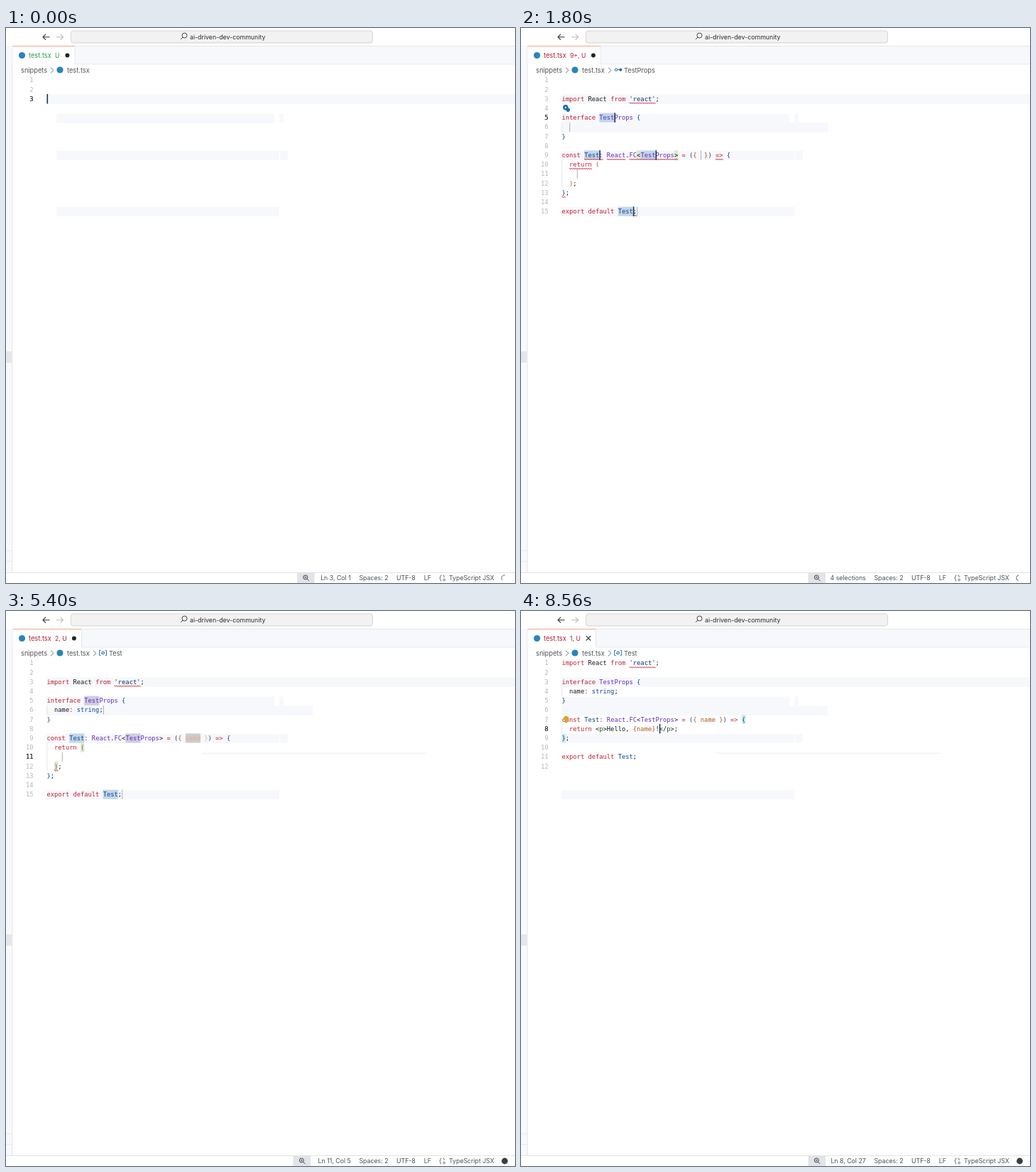
An HTML page that plays this animation: 717x781 px, repeating every 8910 ms.

```html
<!DOCTYPE html>
<html lang="en">
<head>
<meta charset="utf-8">
<title>Editor snippet</title>
<style>
html, body { margin: 0; width: 100%; height: 100%; overflow: hidden; background: #fff; }
svg { display: block; width: 100%; height: 100%; }
text { white-space: pre; }
.mono { font-family: "DejaVu Sans Mono", monospace; font-size: 8.77px; }
.ui { font-family: Inter, "Open Sans", sans-serif; font-size: 9.25px; }
.status { font-size: 8.75px; }
</style>
</head>
<body>
<svg id="stage" viewBox="0 0 717 781" xmlns="http://www.w3.org/2000/svg"></svg>
<script>
const LOOP = 8910, STEP = 200, LAST_STEP = 42, LAST_TIME = 8560;
const CHAR = 5.28, LEFT = 57.5, ROW = 13.2;
const COLORS = {
  r: '#bd1f30', d: '#16191f', s: '#06306b', p: '#622cbc', b: '#0b4597',
  o: '#b8501c', f: '#e3b08f', g: '#116329', y: '#979ba1', k: '#b0a0d0'
};
const stage = document.getElementById('stage');

const colX = col => LEFT + col * CHAR;
const rowY = row => 73.3 + (row - 1) * ROW;
const esc = s => s.replace(/&/g, '&amp;').replace(/</g, '&lt;');
const rect = (x, y, w, h, fill, more = '') =>
  `<rect x="${x}" y="${y}" width="${w}" height="${h}" fill="${fill}" ${more}/>`;
const path = (d, color, width = 1) =>
  `<path d="${d}" fill="none" stroke="${color}" stroke-width="${width}"/>`;
const dot = (x, y, r, fill) => `<circle cx="${x}" cy="${y}" r="${r}" fill="${fill}"/>`;
const text = (x, y, s, fill, cls = 'ui', more = '') =>
  `<text x="${x}" y="${y}" fill="${fill}" class="${cls}" ${more}>${esc(s)}</text>`;
const END = 'text-anchor="end"';

// "~x" inside a code line switches to colour x
function code(row, line) {
  const spans = line.split('~').slice(1).map(part =>
    `<tspan fill="${COLORS[part[0]]}"${part[0] === 'y' ? ' font-style="italic"' : ''}>${esc(part.slice(1))}</tspan>`);
  return `<text class="mono" x="${LEFT}" y="${rowY(row) + 3.1}">${spans.join('')}</text>`;
}
const mark = (row, col, len, fill) =>
  rect(colX(col), rowY(row) - 6.5, len * CHAR, 13, fill);
const caret = (row, col) => rect(colX(col), rowY(row) - 6.8, 1.6, 13.6, '#12355f');
const stop = (row, col) => rect(colX(col) + .2, rowY(row) - 6.5, .9, 13, '#a9a5ad');
const guide = (row, col = 0, rows = 1) =>
  rect(colX(col), rowY(row) - 6.5, .7, ROW * rows, '#dcdde0');

function squiggle(row, col, len) {
  const x = colX(col), y = rowY(row) + 6;
  let d = `M${x} ${y}`;
  for (let i = 0; i < len * 2; i++) d += `q${CHAR / 8} -1.8 ${CHAR / 4} 0t${CHAR / 4} 0`;
  return path(d, '#cf3040', .9);
}
function bulb(row) {
  const y = rowY(row);
  return dot(63.6, y - 1.2, 3.6, '#d9a522') + rect(61.9, y + 1.5, 3.4, 3.4, '#d9a522', 'rx=".8"');
}
function wrench(x, y, color) {
  return path(`M${x - 4} ${y + 4}l4.4 -4.4a2.8 2.8 0 0 1 3.6 -3.6l-1.8 1.8 1.4 1.4 1.8 -1.8a2.8 2.8 0 0 1 -3.6 3.6l-4.4 4.4z`, color, .9);
}
const lens = (x, y, r, dx) =>
  `<circle cx="${x}" cy="${y}" r="${r}" fill="none" stroke="#444"/>` +
  path(`M${x + dx * r * .7} ${y + r * .7}l${dx * 3} 3`, '#444');
const chevron = x => path(`M${x - 2} 55.7l4 3.8 -4 3.8`, '#666', .9);

function snapshot(k) {
  const name = k < 6 ? '' : 'Test'.slice(0, Math.min(4, k - 5));
  const formatted = k >= 39;
  const prop = k < 12 ? '~d  '
    : k < 13 ? '~d  n'
    : k < 14 ? '~d  na'
    : k < 15 ? '~d  name'
    : k < 16 ? '~d  name~r: ~ystring;'
    : '~d  name~r: ~bstring~d;';
  const arg = k < 20 ? '' : 'name'.slice(0, k - 19);
  const faded = k >= 25 && k < 36;
  const hello = 'Hello, {name}!'.slice(0, Math.max(0, Math.min(14, Math.round((k - 32) * 2.4))));
  const greeting = hello.replace(/\{\w*\}?/, '~o$&~d');
  const imports = "~rimport ~dReact ~rfrom ~s'react'~d;";
  const face = `~rinterface ~p${name}${k === 6 ? '~k' : ''}Props ~b{`;
  const head = `~rconst ~b${name}~r: ~pReact~d.~pFC~d<~p${name}Props~d> ~r= ~b(~o{ ${faded ? '~f' : ''}${arg} ${faded ? '~f' : ''}}~b) ~r=> ~b{`;
  const foot = `~rexport default ~b${name}~d;`;
  let lines, cur;

  if (k < 4) {
    const typed = 'rfc'.slice(0, k);
    lines = ['', '', '~d' + typed];
    cur = [3, k];
  } else if (formatted) {
    lines = [imports, '', face, prop, '~b}', '', head,
      '~r  return ~d<~gp~d>Hello, ~o{name}~d!</~gp~d>;', '~b}~d;', '', foot, ''];
    cur = [8, 26];
  } else {
    const body = k < 28 ? [''] : k < 29 ? ['~d    <'] : k < 30 ? ['~d    <~gp']
      : k < 31 ? ['~d    <~gp~d></~gp~d>']
      : ['~d    <~gp~d>', '~d      ' + greeting, '~d    </~gp~d>'];
    lines = ['', '', imports, '', face, prop, '~b}', '', head, '~r  return ~o(',
      ...body, '~o  )~d;', '~b}~d;', '', foot];
    if (k < 11) cur = [5, 10 + name.length];
    else if (k < 19) cur = [6, [2, 3, 4, 6, 8][k - 11] || 15];
    else if (k < 25) cur = [9, 37 + arg.length];
    else if (k < 31) cur = [11, [4, 5, 6, 7][Math.max(0, k - 27)]];
    else cur = [12, 6 + hello.length];
  }
  return { name, arg, lines, cur, formatted };
}

function marks(k, s) {
  const n = s.name.length, blue = '#c3d6e8', violet = '#d0cbe1', teal = '#c9ece8', green = '#d5ead2';
  let out = '';
  if (k >= 6 && k < 31) {
    const inner = k < 11 ? blue : violet;
    out += mark(5, 10, n, inner) + mark(9, 6, n, blue) + mark(9, 17 + n, n, inner) + mark(15, 15, n, blue);
  }
  if (k >= 4 && k < 11) out += mark(9, 16 + n + 1 - 1, 1, green) + mark(9, 17 + 2 * n + 5, 1, green);
  if (k >= 11 && k < 16) out += mark(5, 20, 1, teal) + mark(7, 0, 1, teal);
  if (k >= 12 && k < 16) out += mark(6, 2, s.cur[1] - 2, '#ced2d8');
  if (k >= 19 && k < 25)
    out += mark(9, 36, 1, '#eadfce') + mark(9, 38 + s.arg.length, 1, '#eadfce') + mark(9, 37, s.arg.length, '#dccfc8');
  if (k >= 25 && k < 31) out += mark(9, 37, 4, '#cfcbca');
  if (k >= 25 && !s.formatted) out += mark(10, 9, 1, green) + mark(k < 31 ? 12 : 14, 2, 1, green);
  if (s.formatted) out += mark(7, 48, 1, teal) + mark(9, 0, 1, teal);
  return out;
}

function bands(k) {
  const c = '#f7f8fc', early = k < 4;
  let out = rect(57, 93, 660, 14, '#f6f8fc');
  const left = early ? 71 : 57;
  for (const [y, w] of [[120.5, 391], [173, 397], [252, 385]]) out += rect(left, y, w - left, 13, c);
  out += rect(378, 120.5, 7, 13, '#fff') + rect(385, 173, 1, 13, '#fff');
  if (k > 6) out += rect(57, 133.5, 375, 13.5, c);
  if (k >= 25) out += rect(275, 199.5, 316, 1.2, '#eeeff2');
  return out;
}

function overlays(k, s) {
  const n = s.name.length;
  let out = '';
  if (k >= 4) out += squiggle(s.formatted ? 1 : 3, 18, 7);
  if (k >= 5 && k < 11) {
    out += squiggle(9, 6, n + 1) + squiggle(9, 8 + n, 5) + squiggle(9, 14 + n, 3) + squiggle(9, 17 + n, n + 6)
      + squiggle(9, 33 + 2 * n, 2) + squiggle(10, 2, 6) + squiggle(13, 0, 1) + squiggle(15, 15 + n, 1);
  }
  if (k >= 11 && k < 16) out += squiggle(7, 0, 1);
  if (k >= 11 && k < 31) out += squiggle(12, 2, 1);

  if (k >= 4 && k < 31) {
    if (k < 11) out += stop(6, 2);
    if (k >= 16) out += stop(6, 15);
    if (k < 19) out += stop(9, 29 + 2 * n);
    if (k < 28) out += stop(11, 4);
    out += stop(15, 16 + n);
  }
  if (k >= 4 && k < 11)
    out += caret(5, 10 + n) + caret(9, 6 + n) + caret(9, 17 + 2 * n) + caret(15, 15 + n);
  else if (![26, 27, 41].includes(k)) out += caret(...s.cur);

  if (k >= 5 && k < 11) out += dot(62.8, 111.8, 3.7, '#176eae') + dot(66.2, 115.2, 2.7, '#176eae') + dot(62.8, 111.8, 1.1, '#fff');
  if (k >= 12 && k < 16) out += bulb(5);
  if (k >= 32 && !s.formatted) out += bulb(11);
  if (s.formatted) out += bulb(7);
  if (k === 6) {
    out += rect(115.8, 133.6, 315.8, 15, '#e4e5ea', 'stroke="#c3c4c9" stroke-width=".8" rx="1.5"')
      + text(118, 143, 'abc', '#333', 'ui', 'style="font-size:6.6px"')
      + text(132.5, 143.2, 'T', '#0b57a8', 'mono', 'font-weight="bold"');
  }
  if (k >= 21 && k < 25) out += suggest(colX(k + 17) + 1);
  return out;
}

function suggest(x) {
  const items = [['n', '(property) n: any'], ['nav'], ['noframes'], ['noscript'],
    ['new', 'New Statement'], ['newpromise', 'new Promise']];
  let out = rect(x, 186.4, 316, 81.6, '#fff', 'stroke="#cfd0d4" stroke-width=".9" rx="1.5"')
    + rect(x + .5, 187, 315, 13.2, '#e0e2e7');
  items.forEach(([label, detail], i) => {
    const y = 193.4 + i * 13.15, ix = x + 8;
    if (i === 0)
      out += path(`M${ix - 5} ${y - 1}l6 -3 4 2v4l-6 3 -4 -2zl4 2 6 -3m-6 3v4`, '#333', .8);
    else if (i < 4) out += wrench(ix, y, '#444');
    else out += rect(ix - 4.5, y - 4.3, 9, 9, 'none', 'stroke="#555" stroke-width=".9"');
    out += `<text class="mono" x="${x + 16.8}" y="${y + 3}" fill="#20395a"><tspan fill="#0755a5" font-weight="bold">n</tspan>${label.slice(1)}</text>`;
    if (detail) out += text(x + 308, y + 2.6, detail, '#666a70', 'mono', END + ' style="font-size:7.45px"');
  });
  return out;
}

function chrome(k, s) {
  const ink = '#505358';
  let out = rect(0, 25, 9, 741, '#f8f9fd') + rect(0, 455, 8, 16, '#e4e6ea')
    + rect(0, 735, 9, .8, '#e6e7eb') + rect(0, 750, 9, .8, '#e6e7eb')
    + rect(8.5, 25, .9, 741, '#dfe0e4');
  // title bar
  out += path('M61.5 12.7h-9.5m4 -4l-4 4 4 4', '#333', 1.1) + path('M71 12.7h9.5m-4 -4l4 4 -4 4', '#b9b9bb', 1.1)
    + rect(91.4, 3.9, 425, 17, '#f2f2f2', 'rx="3.5" stroke="#cfcfd1" stroke-width=".9"')
    + lens(251.5, 10.5, 3.5, -1) + text(259, 15.5, 'ai-driven-dev-community', '#2b2b2d', 'ui', 'style="font-size:8.8px"');
  // tabs
  const errors = k < 5 ? '' : k < 11 ? '9+, ' : k < 16 ? '3, ' : k < 31 ? '2, ' : '1, ';
  const right = k < 5 ? 97 : k < 11 ? 112.5 : k < 31 ? 106.5 : 105.5;
  const tint = errors ? '#ae1e32' : '#2c9347';
  out += rect(9.4, 25, 708, 26, '#f7f8fc') + rect(9.4, 25, 708, .8, '#e2e3e7')
    + rect(right, 50.5, 717 - right, .8, '#e5e6ea')
    + rect(9.4, 25, right - 9.4, 27, '#fff') + rect(9.4, 25, right - 9.4, 1, '#f4a58a')
    + rect(right - .5, 25, .8, 26, '#e2e3e7')
    + dot(22.5, 38.5, 4.6, '#2785bd') + text(32, 42, 'test.tsx', tint)
    + text(69, 41.8, errors + 'U', tint, 'ui', 'style="font-size:8.6px"');
  const bx = right - 10.6;
  out += s.formatted ? path(`M${bx - 3.2} 35.1l6.4 6.4m0 -6.4l-6.4 6.4`, '#333', 1.1) : dot(bx, 38.4, 3, '#22252a');
  // breadcrumbs
  out += text(21, 62.8, 'snippets', ink) + chevron(65) + dot(76, 59, 4.6, '#2785bd') + text(86, 62.8, 'test.tsx', ink);
  if (k >= 5) {
    out += chevron(125);
    if (k < 19) {
      out += `<circle cx="134" cy="58.7" r="1.7" fill="none" stroke="#1767ad"/>` + path('M135.8 58.7h3', '#1767ad') + dot(140.3, 58.7, 2, '#1767ad')
        + text(145, 62.8, (k < 7 ? '' : s.name) + 'Props', ink);
      if (k >= 14) out += chevron(195) + wrench(207, 59, '#444') + text(215, 62.8, 'name', ink);
    } else {
      out += path('M133.6 55.4h-2v7h2m6 -7h2v7h-2', '#1767ad', .9)
        + `<circle cx="136.6" cy="58.9" r="2" fill="none" stroke="#1767ad" stroke-width=".9"/>` + path('M135 60.5l3.3 -3.3', '#1767ad', .8)
        + text(145, 62.8, 'Test', ink);
    }
  }
  return out + statusBar(k, s);
}

function statusBar(k, s) {
  const ink = '#4a4d52', cls = 'ui status';
  const col = k >= 20 && k < 25 ? k + 18 : s.cur[1] + 1;
  const where = k >= 4 && k < 11 ? '4 selections' : `Ln ${s.cur[0]}, Col ${col}`;
  const x = where.length > 11 ? 404.5 : 410;
  let out = rect(0, 766, 717, 15, '#fff') + rect(0, 766, 717, .9, '#dfe0e4')
    + rect(x, 767, 24.5, 14, '#e3e4ea') + lens(x + 11.8, 773, 3, 1) + path(`M${x + 10.3} 773h3m-1.5 -1.5v3`, '#444', .7)
    + text(485.7, 777.2, where, ink, cls, END);
  for (const [tx, label] of [[497.5, 'Spaces: 2'], [550, 'UTF-8'], [588.7, 'LF'], [624, 'TypeScript JSX']])
    out += text(tx, 777.2, label, ink, cls);
  out += path('M613.5 770q-1.6 0 -1.6 1.6v1.2l-1 1.3 1 1.3v1.2q0 1.4 1.4 1.4M615.5 770q1.6 0 1.6 1.6v1.5', ink, .9)
    + `<circle cx="617.2" cy="776.6" r="1.3" fill="none" stroke="${ink}" stroke-width=".8"/>`;
  return out + (k < 13
    ? `<g transform="rotate(${k * 37.5} 702 774)">${path('M699.2 777A4.2 4.2 0 0 1 703 769.9', '#666', .9)}</g>`
    : dot(702.5, 774, 4.4, '#3a3d42'));
}

function draw(k) {
  const s = snapshot(k);
  let out = rect(0, 0, 717, 781, '#fff') + bands(k) + marks(k, s);
  if (s.formatted) out += guide(4) + guide(8);
  else if (k >= 4) {
    out += guide(6) + guide(10, 0, k < 31 ? 3 : 5);
    if (k >= 31) out += guide(11, 2, 3);
  }
  s.lines.forEach((line, i) => {
    const active = i + 1 === s.cur[0];
    out += text(38.6, rowY(i + 1) + 3.1, String(i + 1), active ? '#16191f' : '#b3b6bb', 'mono', END + (active ? ' stroke="#16191f" stroke-width=".2"' : ''));
    if (line) out += code(i + 1, line);
  });
  stage.innerHTML = out + overlays(k, s) + chrome(k, s);
}

let shown = -1;
function tick(now) {
  const t = now % LOOP;
  const k = t >= LAST_TIME ? LAST_STEP : Math.min(LAST_STEP - 1, Math.floor(t / STEP));
  if (k !== shown) draw(shown = k);
  requestAnimationFrame(tick);
}
const start = performance.now();
const loop = () => tick(Math.max(0, performance.now() - start));
draw(shown = 0);
requestAnimationFrame(function run() {
  const t = (performance.now() - start) % LOOP;
  const k = t >= LAST_TIME ? LAST_STEP : Math.min(LAST_STEP - 1, Math.floor(t / STEP));
  if (k !== shown) draw(shown = k);
  requestAnimationFrame(run);
});
</script>
</body>
</html>
```
